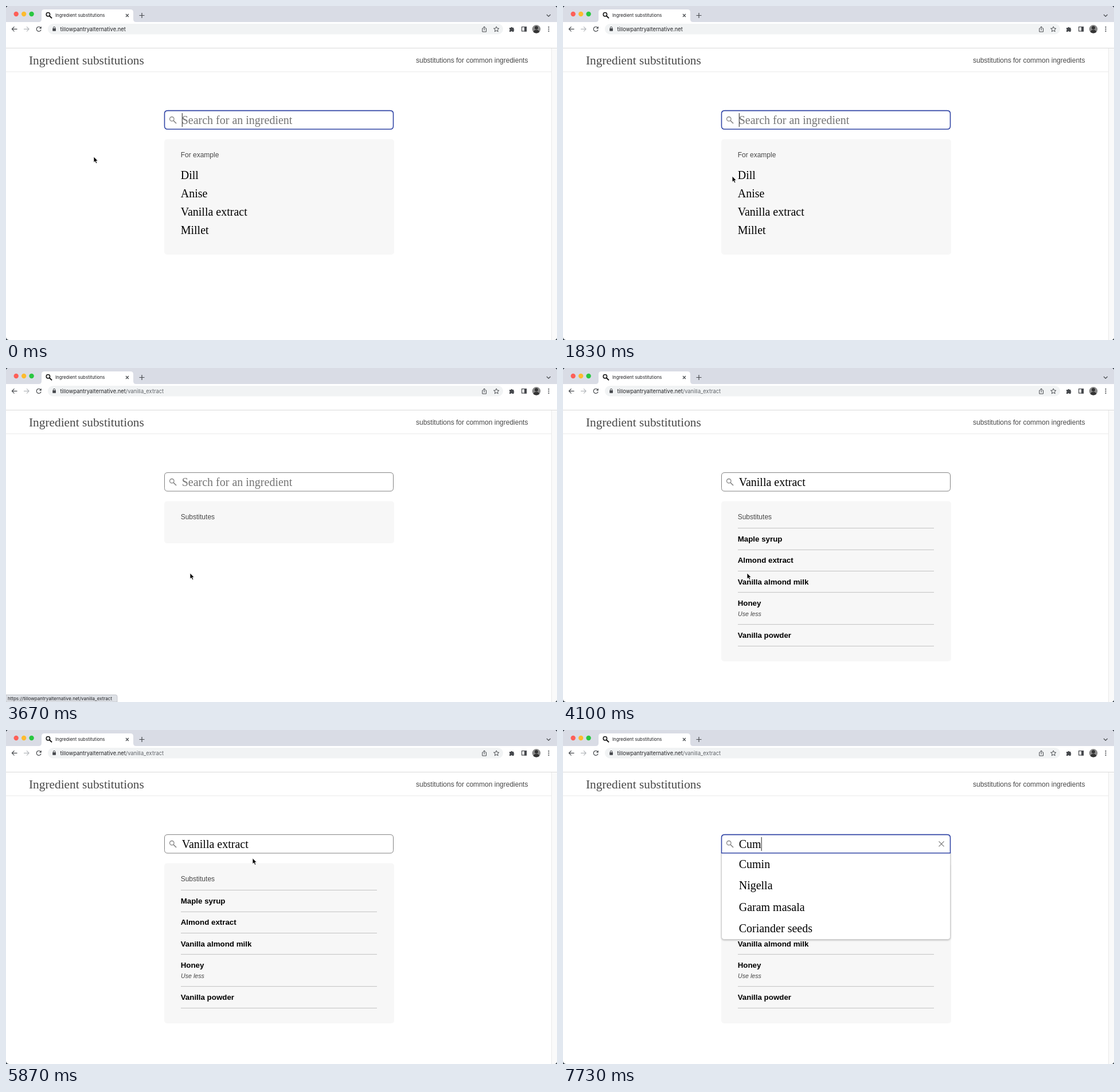
Animation, 961 px wide and 583 px high, one loop 8000 ms. Source, as an HTML page:

```html
<!DOCTYPE html>
<html lang="en">
<head>
<meta charset="utf-8">
<title>Ingredient substitutions</title>
<style>
  html, body { margin: 0; width: 100%; height: 100%; overflow: hidden; background: #26323c; }
  svg { display: block; }
  text { white-space: pre; }
  .ui { font-family: Inter, Roboto, sans-serif; fill: #202124; }
  .serif { font: 20px "Liberation Serif", serif; }
  .sans { font: 12px "Liberation Sans", sans-serif; fill: #484848; }
  .item { font: bold 13.33px "Liberation Sans", sans-serif; }
  .note { font: italic 10.67px "Liberation Sans", sans-serif; fill: #444; }
  .link:hover, .on { text-decoration: underline; }
  .line { fill: none; stroke: #46494d; stroke-width: 1.2; }
  .drop { filter: drop-shadow(0 1px 1.5px #0004); }
</style>
</head>
<body>
<svg width="961" height="583" viewBox="0 0 961 583">
  <rect width="961" height="583" rx="5" fill="#fff"/>

  <!-- tab strip -->
  <path d="M0 28V5Q0 0 5 0H956Q961 0 961 5V28Z" fill="#d9dce5"/>
  <circle cx="17.7" cy="14" r="4.2" fill="#fe5f57"/>
  <circle cx="31.2" cy="14" r="4.2" fill="#febb2e"/>
  <circle cx="44.6" cy="14" r="4.2" fill="#29c740"/>
  <path d="M57 28Q62 28 62 23V11Q62 6 67 6H217Q222 6 222 11V23Q222 28 227 28Z" fill="#fff"/>
  <g fill="none" stroke="#111" stroke-width="1.5">
    <circle cx="73.4" cy="14.8" r="3.2"/>
    <path d="M75.8 17.2L80 21.4" stroke-width="2"/>
  </g>
  <text class="ui" x="86" y="19.3" font-size="7.8">Ingredient substitutions</text>
  <path class="line" d="M209 14L214 19M214 14L209 19M232.5 16.5H241.5M237 12V21M943 15L946.3 18.2L949.6 15"/>

  <!-- toolbar -->
  <rect x="73" y="31" width="794" height="18.5" rx="9.2" fill="#f1f3f4"/>
  <path class="line" d="M19.5 40.3H10.5M14.5 36.2L10.4 40.3L14.5 44.4"/>
  <path class="line" d="M31 40.3H40M36 36.2L40.1 40.3L36 44.4" style="stroke:#b4b7bb"/>
  <path class="line" d="M60.6 38A4 4 0 1 0 61.1 41.5"/>
  <path d="M61.8 35.6V39.6H57.8Z" fill="#46494d"/>
  <rect x="81.2" y="39" width="5.8" height="4.8" rx=".7" fill="#46494d"/>
  <path class="line" d="M82.4 39.5V38A1.7 1.7 0 0 1 85.8 38V39.5" style="stroke-width:1"/>
  <path class="line" d="M832.5 39H830.8V45H837.6V39H836M834.2 42.5V36M832.2 37.8L834.2 35.8L836.2 37.8" style="stroke-width:1"/>
  <path class="line" d="M855.3 35.8L856.6 38.9L860 39.2L857.4 41.4L858.2 44.7L855.3 42.9L852.4 44.7L853.2 41.4L850.6 39.2L854 38.9Z" style="stroke-width:1"/>
  <path d="M878 38H880.4A1.6 1.6 0 0 1 883.5 38H885.6V40.4A1.5 1.5 0 0 1 885.6 43V45H883A1.4 1.4 0 0 0 880.4 45H878V42.7A1.4 1.4 0 0 0 878 40.2Z" fill="#46494d"/>
  <rect class="line" x="899.6" y="36.5" width="8" height="7.4"/>
  <path d="M904 36H908V44.5H904Z" fill="#46494d"/>
  <circle cx="925" cy="40.3" r="7.3" fill="#8b8b8b"/>
  <path d="M919.8 45.4Q920.5 41.4 925 41.4T930.2 45.4Q925 49.6 919.8 45.4Z" fill="#333"/>
  <circle cx="925" cy="38" r="3" fill="#333"/>
  <g fill="#46494d">
    <circle cx="946.5" cy="36.8" r="1.1"/><circle cx="946.5" cy="40.3" r="1.1"/><circle cx="946.5" cy="43.8" r="1.1"/>
  </g>

  <!-- page header and scrollbar -->
  <path d="M951 74H961V578Q961 583 956 583H951Z" fill="#fafafa"/>
  <path d="M0 73.5H961" stroke="#dadada"/>
  <path d="M951.5 74V583M0 114.8H951" stroke="#e9e9e9"/>
  <text class="serif" x="40" y="101.5" style="font-size:21.33px" fill="#484848">Ingredient substitutions</text>
  <text class="sans" x="715" y="99">substitutions for common ingredients</text>

  <g id="page"></g>
</svg>
<script>
const LOOP = 8000, CLICK = 3600, LOADED = 3870, FOCUS = 6370, TYPE = 7000;
const HOST = 'tillowpantryalternative.net', PATH = '/vanilla_extract', PICK = 'Vanilla extract';
const LINKS = ['Dill', 'Anise', PICK, 'Millet'];
const RESULTS = [['Maple syrup', 303], ['Almond extract', 340.4], ['Vanilla almond milk', 377.8],
  ['Honey', 415.2], ['Vanilla powder', 471.2]];
const RULES = [279.5, 317.3, 354.5, 391.6, 447.6, 485.4];

// From each time on: the typed text, its caret and the suggestions below it.
const TYPED = [
  [FOCUS, PICK, 0, [PICK]],
  [TYPE, 'C', 320.3, ['Cayenne pepper', 'Cauliflower', "Confectioners' sugar", 'Caraway seeds']],
  [7370, 'Cu', 330.3, ['Cumin', 'Curry powder', 'Currants', 'Cucumber']],
  [7630, 'Cum', 346.2, ['Cumin', 'Nigella', 'Garam masala', 'Coriander seeds']],
];

// Pointer: time, x, y
const MOVES = [[0, 153, 263], [830, 153, 263], [1830, 295, 297], [2250, 310, 308], [2900, 317.5, 343],
  [3350, 321, 358], [4900, 321, 358], [5170, 364, 322], [6250, 445, 199], [LOOP, 445, 199]];

const text = (cls, x, y, str, extra = '') => `<text class="${cls}" x="${x}" y="${y}" ${extra}>${str}</text>`;
const rect = (x, y, w, h, extra) => `<rect x="${x}" y="${y}" width="${w}" height="${h}" ${extra}/>`;
const path = (d, extra) => `<path d="${d}" ${extra}/>`;

// Speed through a waypoint; zero where the pointer rests on either side.
function speed(i, k) {
  const a = MOVES[i - 1], b = MOVES[i], c = MOVES[i + 1];
  if (!a || !c || a[k] === b[k] || b[k] === c[k]) return 0;
  return (c[k] - a[k]) / (c[0] - a[0]);
}

function pointer(t) {
  const i = MOVES.findLastIndex(m => m[0] <= t), a = MOVES[i], b = MOVES[i + 1];
  const d = b[0] - a[0], u = (t - a[0]) / d, v = 1 - u;
  return [1, 2].map(k => v * v * (1 + 2 * u) * a[k] + u * u * (3 - 2 * u) * b[k]
    + d * u * v * (v * speed(i, k) - u * speed(i + 1, k)));
}

const CURSORS = {
  arrow: path('M0 0V10.2L2.3 8.1L4 11.8L5.9 11L4.2 7.4H7.3Z', 'fill="#000" stroke="#fff" stroke-width=".8"'),
  hand: path('M-1 .8Q0 -.8 1 .8V4Q2 3.2 2.8 4.2Q3.8 3.5 4.5 4.6Q6 4.2 6 5.8V8.2L5 12H-.8L-3.4 8Q-4.2 6.4 -2.6 6.3L-1 7.6Z',
    'fill="#fff" stroke="#111" stroke-width="1"'),
  beam: path('M-2.3 -5Q0 -5 0 -3.5Q0 -5 2.3 -5M0 -4V4M-2.3 5Q0 5 0 3.5Q0 5 2.3 5M-1.2 .8H1.2',
    'fill="none" stroke="#111" stroke-width="1"'),
};

function panel(t, hover) {
  const home = t < CLICK, loaded = t >= LOADED;
  const bottom = home ? 434 : loaded ? 512 : 306;
  let out = rect(276, 232.5, 401, bottom - 232.5, 'rx="5" fill="#f7f7f7"')
    + text('sans', 304.7, 263.5, home ? 'For example' : 'Substitutes');
  if (home) out += LINKS.map((s, i) => text('serif' + (i === hover ? ' on' : ''), 304.7, 302.3 + 32 * i, s)).join('');
  if (loaded) {
    out += RULES.map(y => path(`M305 ${y}H647`, 'stroke="#c2c2c2"')).join('')
      + RESULTS.map(([s, y]) => text('item', 304.7, y, s)).join('')
      + text('note', 305, 433, 'Use less');
  }
  return out;
}

function search(t) {
  const typed = TYPED.findLast(s => s[0] <= t);
  const focused = t < CLICK || typed;
  let out = '';
  if (typed) {
    const rows = typed[3], end = 215.5 + 37.5 * rows.length;
    out += path(`M276.5 214H675.5V${end - 5}Q675.5 ${end} 670.5 ${end}H281.5Q276.5 ${end} 276.5 ${end - 5}Z`,
      'class="drop" fill="#fff" stroke="#c8c8c8" stroke-width=".8"')
      + rows.map((s, i) => text('serif', 306.7, 241 + 37.4 * i, s)).join('');
  }
  const foot = typed ? 'V214.8H276.5V' : 'V209.5Q675.5 215 670 215H282Q276.5 215 276.5 209.5V';
  out += path(`M276.5 188Q276.5 182.6 282 182.6H670Q675.5 182.6 675.5 188${foot}188Z`,
    `fill="#fff" stroke="${focused ? '#3145a5' : '#828282'}" stroke-width="${focused ? 1.6 : 1}"`);
  out += '<g fill="none" stroke="#858585" stroke-width="1.3"><circle cx="289.3" cy="197.2" r="3.7"/>'
    + path('M292 200L297 205', 'stroke-width="1.7"') + '</g>';
  if (typed) out += path('M655.5 194.3L664.5 203.3M664.5 194.3L655.5 203.3', 'stroke="#777" stroke-width="1.2"');
  if (typed && t < TYPE) out += rect(307, 187, 116, 24, 'fill="#accffa"');

  const value = typed ? typed[1] : t >= LOADED ? PICK : '';
  out += value ? text('serif', 306.7, 205.7, value)
    : text('serif', 306.7, 205.7, 'Search for an ingredient', 'fill="#757575"');
  const caret = typed ? typed[2] : t < CLICK && (t + 330) % 1000 < 500 ? 307.3 : 0;
  if (caret) out += path(`M${caret} 187V211`, 'stroke="#222"');
  return out;
}

function draw(t) {
  const [x, y] = pointer(t);
  const hover = t < CLICK && x >= 305 ? Math.floor((y - 280) / 32) : -1;
  const inInput = x > 276 && y > 182 && y < 216;
  let out = text('ui', 94.5, 43.6,
    HOST + (t < CLICK ? '' : `<tspan fill="#5f6368">${PATH}</tspan>`), 'font-size="9.33"');
  out += panel(t, hover) + search(t);
  if (t >= 3150 && t < 4000) {
    out += path('M0 570.5H191Q194 570.5 194 573.5V583H0Z', 'fill="#dee1e6" stroke="#b9bcc2" stroke-width=".8"')
      + text('ui', 3, 579.6, 'https://' + HOST + PATH, 'font-size="8"');
  }
  if (t < TYPE) {
    const shape = hover >= 0 ? 'hand' : inInput ? 'beam' : 'arrow';
    out += `<g transform="translate(${x} ${y})">${CURSORS[shape]}</g>`;
  }
  return out;
}

const page = document.getElementById('page');
const start = performance.now();
let last = '';
function tick() {
  const next = draw((performance.now() - start) % LOOP);
  if (next !== last) page.innerHTML = last = next;
  requestAnimationFrame(tick);
}
tick();
</script>
</body>
</html>
```
